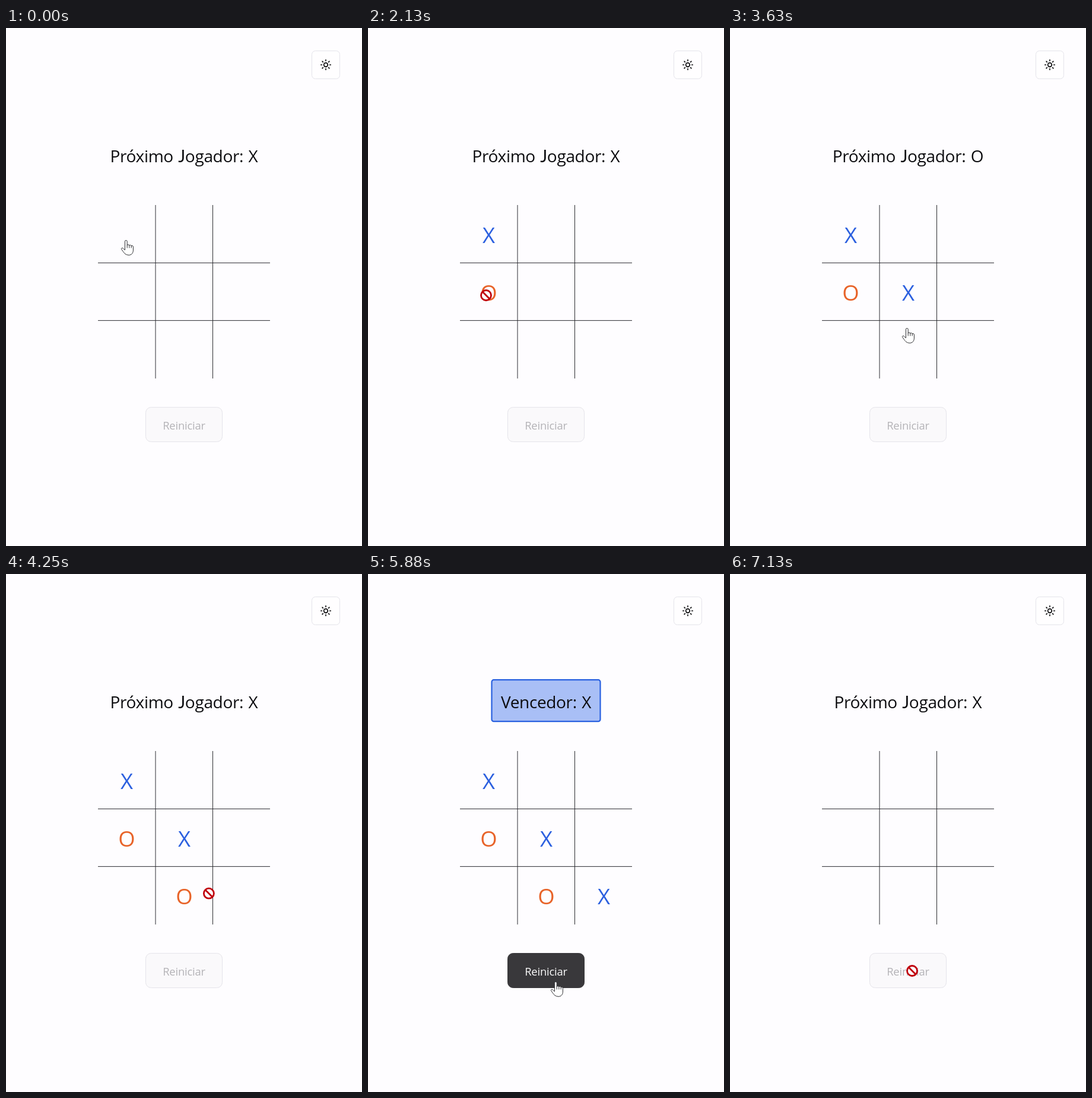
Animation of 600 by 872 pixels, one loop 8 s. Source, as an HTML page:

```html
<!DOCTYPE html>
<html lang="pt">
<head>
<meta charset="utf-8">
<title>Jogo da velha</title>
<style>
  html, body { margin: 0; width: 100%; height: 100%; overflow: hidden; background: #fefdff; }
  svg { display: block; width: 600px; height: 872px; }
  text { font-family: "Open Sans", "Noto Sans", sans-serif; text-anchor: middle; }
  .title { font-size: 28px; letter-spacing: -.35px; word-spacing: 1.5px; fill: #0c0c0f; }
  .jay { font-family: Lato, sans-serif; }
  .mark { font-size: 36.5px; }
  .label { font-size: 18.4px; letter-spacing: -.2px; }
</style>
</head>
<body>
<svg viewBox="0 0 600 872">
  <rect width="600" height="872" fill="#fefdff"/>

  <rect x="515.5" y="38.5" width="47" height="47" rx="6" fill="#fffeff" stroke="#e4e4ea"/>
  <g id="sun" transform="translate(539 62) scale(.83)" fill="none" stroke="#09090b" stroke-width="2" stroke-linecap="round">
    <circle r="4"/>
  </g>

  <rect id="banner" x="208.5" y="178.2" width="183" height="70" rx="3.5" fill="#a9bff6" stroke="#2860e0" stroke-width="2.2"/>
  <text id="next" class="title" x="300" y="225.5">Próximo <tspan class="jay">J</tspan>ogador: <tspan id="player">X</tspan></text>
  <text id="winner" class="title" x="300" y="225.5">Vencedor: X</text>

  <path d="M252 298V590M348.5 298V590M155 395.4H445M155 492.4H445" stroke="#2b2b30" fill="none"/>
  <g id="marks"></g>

  <rect id="button" x="235.5" y="638.5" width="129" height="58" rx="9"/>
  <text id="label" class="label" x="300" y="676">Reiniciar</text>

  <g id="hand" fill="#fff" stroke="#2c2c30" stroke-linejoin="round" stroke-linecap="round">
    <path d="M-1.6 16.5V2.4a1.9 1.9 0 0 1 3.8 0V8.6c.4-1.2 3.2-1.2 3.6.4c.5-1 3-1 3.4.8c.6-.9 3-.6 3.2 1.4V17c0 5-3 8.3-7.5 8.3C0 25.3-3 22-4.6 19.3L-7.4 15.4c-.8-1.3.8-2.9 2.3-1.9z"/>
    <path d="M2.2 8.6V13M5.8 9V13M9.2 9.8V13" fill="none"/>
  </g>
  <g id="stop" fill="#fff" stroke="#c0000c" stroke-width="2.8">
    <circle r="8.5"/>
    <path d="M-6-6L6 6"/>
  </g>
</svg>
<script>
const LOOP = 8000, STEP = 125, RESET = 7000;
const CELL = 97, LEFT = 155, TOP = 298;

// X and O take turns; cells count row by row
const moves = [0, 3, 4, 7, 8].map((cell, i, all) => ({
  time: 1000 * (i + 1) + (i === all.length - 1 ? 2 * STEP : 0),
  cell,
  mark: "XO"[i % 2]
}));

// places the pointer passes: arrival, x, y and how long it rests
const stops = [
  [0, 202, 357, 1375],
  [1500, 213, 422, 0],
  [1875, 199, 450, 250],
  [2750, 292, 455, 375],
  [3625, 298, 505, 0],
  [4000, 299, 532, 0],
  [5000, 397, 545, 750],
  [5875, 316, 686, 0],
  [6500, 307, 668, LOOP]
];

const $ = id => document.getElementById(id);
const show = (el, on) => el.setAttribute("display", on ? "inline" : "none");
const easeOut = k => 1 - (1 - k) ** 2;

function add(parent, tag, attrs) {
  const el = document.createElementNS("http://www.w3.org/2000/svg", tag);
  for (const key in attrs) el.setAttribute(key, attrs[key]);
  return parent.appendChild(el);
}

for (let a = 0; a < 360; a += 45) {
  add($("sun"), "path", { d: "M8 0H10", transform: `rotate(${a})` });
}

for (const move of moves) {
  move.el = add($("marks"), "text", {
    class: "mark",
    x: LEFT + CELL * (move.cell % 3 + .5),
    y: TOP + CELL * (Math.floor(move.cell / 3) + .5) + 15.5,
    fill: move.mark === "X" ? "#2c60df" : "#e8642a"
  });
  move.el.textContent = move.mark;
}

function pointerAt(t) {
  const i = stops.findLastIndex(s => s[0] <= t);
  const [arrive, x, y, rest] = stops[i];
  const leave = arrive + rest;
  if (t <= leave) return [x, y];
  const [end, x1, y1] = stops[i + 1];
  const k = easeOut((t - leave) / (end - leave));
  return [x + (x1 - x) * k, y + (y1 - y) * k];
}

function draw(t) {
  const placed = t < RESET ? moves.filter(m => m.time <= t) : [];
  const won = placed.length === moves.length;
  const [x, y] = pointerAt(Math.floor(t / STEP) * STEP);

  for (const move of moves) show(move.el, placed.includes(move));
  show($("banner"), won);
  show($("winner"), won);
  show($("next"), !won);
  $("player").textContent = "XO"[placed.length % 2];

  const onButton = y > 638;
  const hover = won && onButton;
  $("button").setAttribute("fill", hover ? "#39383b" : "#faf9fb");
  $("button").setAttribute("stroke", hover ? "#39383b" : "#e5e4ea");
  $("label").setAttribute("fill", hover ? "#fafafa" : won ? "#18181b" : "#b4b3b7");

  const cell = Math.floor((x - LEFT) / CELL) + 3 * Math.floor((y - TOP) / CELL);
  const blocked = onButton ? !won : won || placed.some(m => m.cell === cell);
  show($("stop"), blocked);
  show($("hand"), !blocked);
  $(blocked ? "stop" : "hand").setAttribute("transform", `translate(${x} ${y})`);
}

const start = performance.now();
function tick() {
  draw((performance.now() - start) % LOOP);
  requestAnimationFrame(tick);
}
tick();
</script>
</body>
</html>
```
